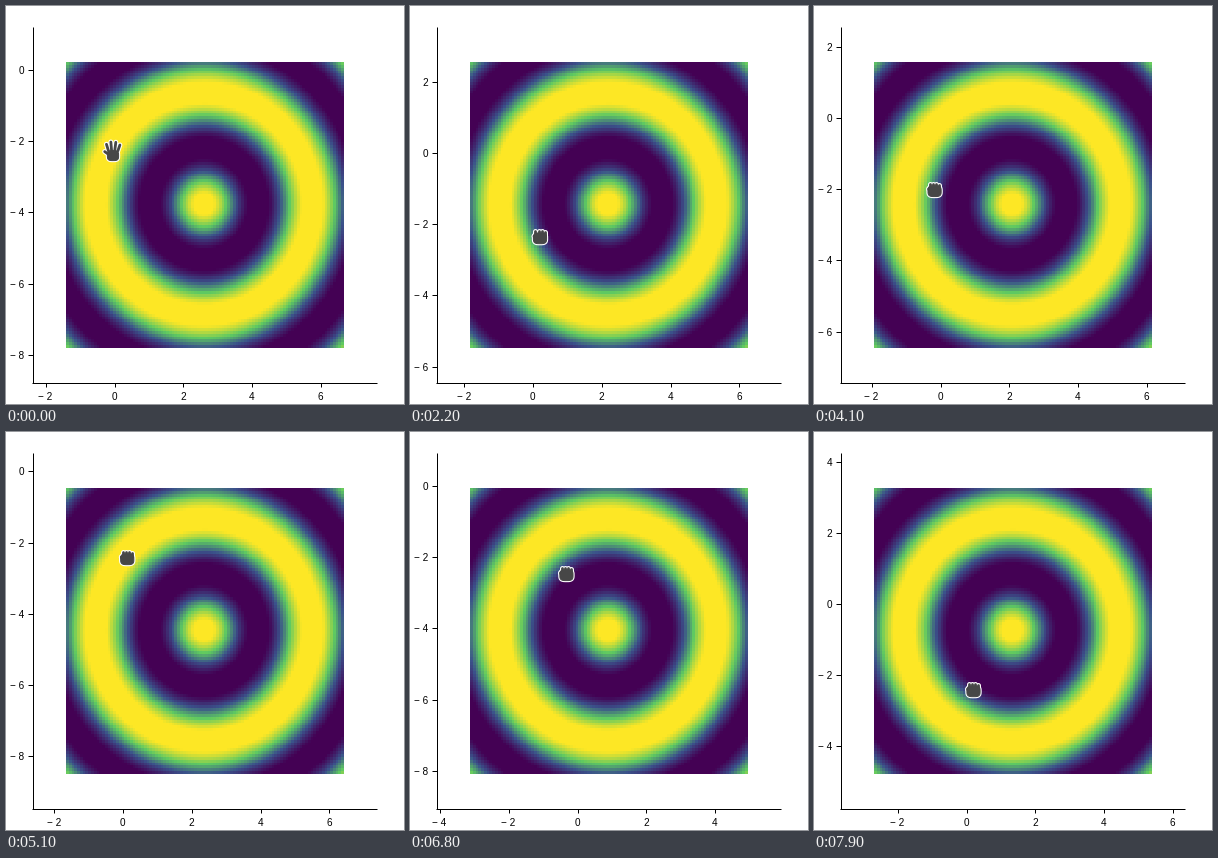
These frames come from a looping animation (398x398 px, 8 s). A matplotlib script:

```python
import numpy as np
import matplotlib.pyplot as plt
from matplotlib.animation import FuncAnimation
from matplotlib.colors import LinearSegmentedColormap
from matplotlib.transforms import Affine2D

SIZE, DPI, STEP, FRAMES = 398, 100, 100, 80
PX = 72 / DPI                                  # one pixel in points
LEFT, RIGHT, TOP, BOTTOM = 27, 371, 21, 377    # plot area
UX, UY = (RIGHT - LEFT) / 10, (BOTTOM - TOP) / 10
GRAB, DRAG = 900, 1300                         # hand closes, first pull
GRIP = np.array([-1.5, 83.5])                  # hand relative to the data origin

# turning points of the drags: time in ms, pixel position of the data origin
PATH = np.array([
    (1200, 108.5, 64), (1600, 97.5, 104), (2100, 116.5, 147),
    (2900, 194.5, 147), (3100, 211, 147), (3300, 211, 147),
    (4100, 126.5, 112), (4600, 112, 37), (4900, 112, 37),
    (5900, 186.5, 60), (6200, 216, 58), (6800, 167.5, 54),
    (7300, 126, 108), (7900, 152.5, 172), (8000, 161, 174),
])


def glide(t, keys):
    """Ease through the key points without overshoot (monotone cubic)."""
    tk, v = keys[:, 0], keys[:, 1:]
    h = np.diff(tk)[:, None]
    d = np.diff(v, axis=0) / h
    prod = d[:-1] * d[1:]
    m = np.zeros_like(v)
    np.divide(2 * prod, d[:-1] + d[1:], out=m[1:-1], where=prod > 0)
    t = np.clip(t, tk[0], tk[-1])
    k = np.clip(np.searchsorted(tk, t, side="right") - 1, 0, len(h) - 1)
    s = (t - tk[k])[:, None] / h[k]
    return (v[k] + (v[k + 1] - v[k]) * s ** 2 * (3 - 2 * s)
            + h[k] * s * (1 - s) * (m[k] * (1 - s) - m[k + 1] * s))


origin = glide(np.arange(FRAMES + 1) * STEP, PATH)

plt.rcParams["font.family"] = "Liberation Sans"
fig = plt.figure(figsize=(SIZE / DPI, SIZE / DPI), dpi=DPI, facecolor="white")
ax = fig.add_axes([0, 0, 1, 1])

# heat map of cos(2r), slightly clipped at both ends
cmap = LinearSegmentedColormap.from_list(
    "rings", ["#440154", "#3b528b", "#5ec962", "#fde725"])
g = np.linspace(-4, 4, 100) + .03
r = np.hypot(*np.meshgrid(g, g))
ax.imshow(np.cos(2 * r), cmap=cmap, vmin=-.83, vmax=.83, aspect="auto",
          interpolation="nearest", extent=(60, 338, 342, 56))

line = dict(color="black", lw=PX, solid_capstyle="butt", snap=True)
ax.plot([LEFT - .5] * 2, [TOP, BOTTOM], **line)
ax.plot([LEFT - 1, RIGHT], [BOTTOM - .5] * 2, **line)


def make_ticks(ha):
    return [(ax.plot([], [], **line)[0],
             ax.text(0, 0, "", ha=ha, va="baseline", size=10 * PX, color="black"))
            for _ in range(7)]


x_ticks, y_ticks = make_ticks("center"), make_ticks("right")
move = Affine2D()


def make_hand(reach, taper, spread, palm, thumb):
    """Fan of four fingers, a thumb and a rounded palm, white rim below dark fill."""
    k = np.arange(4)
    length = reach - taper * (k - 1.4) ** 2
    angle = np.radians(spread) * (k - 1.4)
    base = 3.1 * (k - 1.45)
    strokes = [((b, b + n * np.sin(a)), (0, -n * np.cos(a)))
               for b, n, a in zip(base, length, angle)]
    strokes.append(((-3.5, thumb[0]), (4, thumb[1])))

    cy, w, h = palm
    a = np.linspace(0, 2 * np.pi, 40)
    c, s = np.cos(a), np.sin(a)
    px = w * np.sign(c) * np.abs(c) ** .6
    py = cy + h * np.sign(s) * np.abs(s) ** .6

    tr = move + ax.transData
    parts = []
    for color, rim, z in (("white", 2.2, 10), ("#474747", 0, 11)):
        for xs, ys in strokes:
            parts += ax.plot(xs, ys, color=color, lw=(2.8 + rim) * PX,
                             solid_capstyle="round", transform=tr, zorder=z)
        parts += ax.fill(px, py, facecolor=color, edgecolor=color,
                         lw=(1 + rim) * PX, transform=tr, zorder=z)
    return parts


open_hand = make_hand(9.2, 1.1, 12, (4.6, 5.6, 5), (-8.3, .6))
closed_hand = make_hand(5.6, .3, 0, (1.8, 6.6, 5.4), (-6, -.3))

ax.set_xlim(0, SIZE)
ax.set_ylim(SIZE, 0)
ax.axis("off")


def set_ticks(ticks, zero, unit, lo, hi, vertical):
    shown = [v for v in range(-16, 17, 2) if lo <= zero + v * unit <= hi]
    for k, (mark, text) in enumerate(ticks):
        on = k < len(shown)
        mark.set_visible(on)
        text.set_visible(on)
        if not on:
            continue
        v = shown[k]
        p = zero + v * unit
        text.set_text(str(v) if v >= 0 else f"\u2212 {-v}")
        if vertical:
            mark.set_data([LEFT - 5, LEFT], [p, p])
            text.set_position((18, p + 4))
        else:
            mark.set_data([p, p], [BOTTOM, BOTTOM + 4])
            text.set_position((p - .3, 394))


def hand_position(i):
    if i * STEP < GRAB:
        return 107, 145
    if i * STEP < DRAG:
        return 107, 157
    # the hand runs one step ahead of the axes while they move
    moving = np.any(origin[i] != origin[i - 1])
    return origin[i + int(moving)] + GRIP


def update(i):
    zx, zy = origin[i]
    set_ticks(x_ticks, zx, UX, LEFT, RIGHT, False)
    set_ticks(y_ticks, zy, -UY, TOP, BOTTOM, True)
    move.clear().translate(*hand_position(i))
    closed = i * STEP >= GRAB
    for part in open_hand:
        part.set_visible(not closed)
    for part in closed_hand:
        part.set_visible(closed)
    return []


anim = FuncAnimation(fig, update, frames=FRAMES, interval=STEP,
                     repeat=True, repeat_delay=0, blit=False)
plt.show()
```
